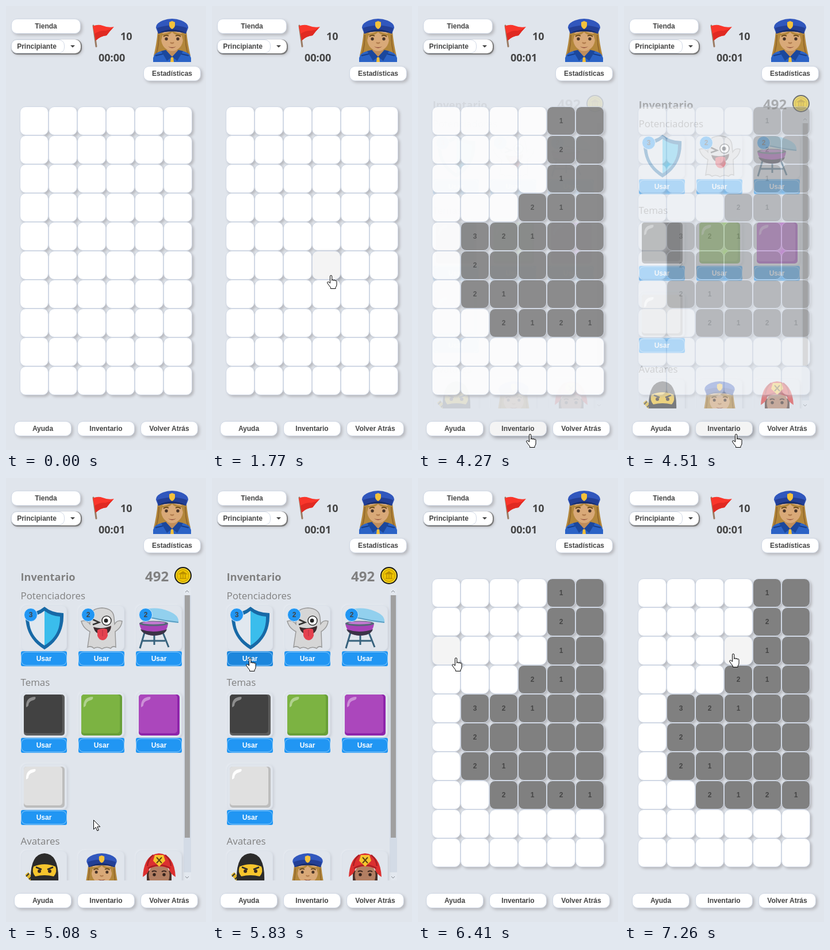
Write an HTML page that moves like this. It is 348x769 px and loops after 8 s.

```html
<!DOCTYPE html>
<html lang="es">
<head>
<meta charset="utf-8">
<title>Buscaminas</title>
<style>
html, body { margin: 0; width: 100%; height: 100%; overflow: hidden; background: #e0e5ec; }
#stage { position: relative; width: 348px; height: 769px; overflow: hidden; background: #e0e5ec; }
.layer { position: absolute; left: 0; top: 0; width: 348px; height: 769px; }
.list { clip-path: inset(188px 0 72px 0); }
.box {
  position: absolute; box-sizing: border-box; border: 1px solid #d1d9e6; border-radius: 10px;
  display: flex; align-items: center; justify-content: center; white-space: nowrap;
  font: bold 12px "Liberation Sans", Arial, sans-serif; color: #444;
}
.btn, .cell { background: #fff; box-shadow: 3px 3px 5px #b8b9be; }
.cell { box-shadow: 3px 3px 4px #b8b9be; }
.btn.hover, .cell.hover { background: #f4f4f4; box-shadow: 3px 3px 6px #989aa0; }
.cell.open { background: #808080; }
.select { background: #fff; border: 0; box-shadow: 1px 1px 1px 1px #777, 3px 3px 5px #b8b9be; }
.pill { background: #fff; }
.card { border-color: #dbe1ea; box-shadow: 2px 2px 4px #c9ced6, -1px -1px 3px #eaeef4; }
.use { background: #2196f3; border: 0; border-radius: 3px; color: #fff; }
.use::after { content: ""; position: absolute; inset: 1px 0; border: 1px solid #8fcbfa; border-radius: 9px; }
.use.hover { background: #1c86dc; }
.badge { background: #2196f3; border-color: #dcecf9; border-radius: 50%; }
svg text { font-family: "Open Sans", "Noto Sans", sans-serif; }
.big { font-weight: 700; font-size: 18px; fill: #444; }
.title { font-weight: 700; font-size: 18.2px; fill: #808080; }
.head { font-size: 16.9px; fill: #808080; }
#cursor { position: absolute; left: 0; top: 0; overflow: visible; }
</style>
</head>
<body>
<div id="stage">
  <svg class="layer" viewBox="0 0 348 769">
    <defs>
      <symbol id="police" viewBox="0 0 76 78">
        <path d="M13 24Q11 46 6 66L18 72H58L70 66Q65 46 63 24Z" fill="#b3873c"/>
        <path d="M15 30Q15 50 10 64M61 30Q61 50 66 64" fill="none" stroke="#94692b" stroke-width="2"/>
        <path d="M5 77V70Q7 61 19 58L38 66 57 58Q69 61 71 70V77Z" fill="#2b63c6"/>
        <path d="M29 50H47V62L38 69 29 62Z" fill="#c08e5c"/>
        <path d="M19 58L27 56 38 68 29 75ZM57 58L49 56 38 68 47 75Z" fill="#1b479c"/>
        <path d="M9 66L22 63M67 66L54 63" stroke="#173d88" stroke-width="2"/>
        <path d="M36 69H40L41 77H35Z" fill="#f2bf3a"/>
        <ellipse cx="38" cy="37" rx="19" ry="21" fill="#d9a978"/>
        <path d="M18 27Q24 30 38 23Q52 30 58 27L61 46Q56 40 55 31Q44 32 38 25Q32 32 21 31Q20 40 15 46Z" fill="#b3873c"/>
        <path d="M23 33Q27 29 32 32M44 32Q49 29 53 33" fill="none" stroke="#6b4a20" stroke-width="2"/>
        <circle cx="28" cy="37" r="2.7" fill="#4a3528"/><circle cx="48" cy="37" r="2.7" fill="#4a3528"/>
        <path d="M35 43Q38 46 41 43" fill="none" stroke="#b27d4e" stroke-width="2.4"/>
        <path d="M31 50Q38 53 45 50Q38 56 31 50Z" fill="#8d4a38"/>
        <path d="M10 18Q9 10 22 5Q38-1 54 5Q67 10 66 18L62 28Q38 19 14 28Z" fill="#3157bd"/>
        <path d="M12 18Q38 9 64 18L62 28Q38 19 14 28Z" fill="#233f95"/>
        <path d="M14 27Q38 14 62 27Q50 24 38 24Q26 24 14 27Z" fill="#172d6c"/>
        <path d="M38 6L43 8V14Q42 18 38 20Q34 18 33 14V8Z" fill="#f4c13c"/>
      </symbol>
    </defs>
    <path d="M152 34L157 70" stroke="#9a7b63" stroke-width="3" stroke-linecap="round"/>
    <path d="M151 35Q160 31 168 34Q178 38 188 36Q180 44 175 51Q164 52 156 60Z" fill="#f9362b"/>
    <path d="M154 48Q164 42 173 43Q180 42 186 38Q180 44 175 51Q164 52 156 60Z" fill="#e02a22"/>
    <text class="big" x="199" y="59">10</text>
    <text class="big" id="timer" x="161" y="96">00:00</text>
    <use href="#police" x="251" y="20" width="76" height="78"/>
  </svg>
  <div id="buttons" class="layer"></div>
  <div id="inv" class="layer">
    <svg class="layer" viewBox="0 0 348 769">
      <text class="title" x="25.500" y="178">Inventario</text>
      <text class="title" x="242" y="179" style="font-size:24px">492</text>
      <circle cx="308" cy="169" r="14" fill="#f6d51f" stroke="#191919" stroke-width="2"/>
      <circle cx="308" cy="169" r="10.500" fill="#efc400" stroke="#b98f00"/>
      <path d="M302 166L308 162 314 166ZM302 174H314M304 167V173M308 167V173M312 167V173" fill="#b98f00" stroke="#b98f00" stroke-width="1.400"/>
      <rect x="309" y="190" width="13" height="507" fill="#e3e8ef"/>
      <rect x="309" y="203" width="13" height="480" fill="#d3dbe6"/>
      <rect x="311" y="203" width="9" height="420" fill="#a0a0a0"/>
      <path d="M312 198L315 195 318 198M312 690L315 693 318 690" fill="none" stroke="#858a91"/>
    </svg>
    <div id="list" class="layer list">
      <div id="cards" class="layer"></div>
      <svg class="layer" viewBox="0 0 348 769">
        <text class="head" x="25.500" y="210">Potenciadores</text>
        <text class="head" x="25.500" y="360">Temas</text>
        <text class="head" x="25.500" y="635">Avatares</text>
        <!-- shield -->
        <path d="M67 223Q80 234 100 234Q102 276 67 297Q32 276 34 234Q54 234 67 223Z" fill="#1769a6"/>
        <path d="M67 230V290Q39 273 40 240Q56 239 67 230Z" fill="#e1e8ef"/>
        <path d="M67 230V290Q95 273 94 240Q78 239 67 230Z" fill="#3abdec"/>
        <!-- ghost -->
        <path d="M146 241Q147 226 167 225Q187 226 188 242L189 253Q194 245 202 248Q201 259 190 266L191 293Q186 290 182 295Q174 291 167 296Q160 291 153 295Q148 290 142 293L146 266Q134 260 131 248Q140 245 146 253Z" fill="#d6d6d6" stroke="#999" stroke-width="1.500"/>
        <path d="M151 245L162 250 151 254" fill="none" stroke="#333" stroke-width="2.500"/>
        <circle cx="175" cy="247" r="8" fill="#fff" stroke="#333" stroke-width="1.500"/>
        <circle cx="174" cy="247" r="3.500" fill="#222"/>
        <path d="M152 258Q167 263 183 256Q182 271 168 271Q155 271 152 258Z" fill="#3c2b2e"/>
        <path d="M159 263Q168 259 176 262L177 273Q174 281 168 281Q161 280 159 273Z" fill="#e4414e"/>
        <path d="M168 263V274" stroke="#b52f40"/>
        <!-- grill -->
        <path d="M241 268L233 295M258 272V289M273 268L283 293M238 282H277" fill="none" stroke="#37627d" stroke-width="3"/>
        <path d="M239 228Q262 222 284 231Q302 238 300 251Q277 250 240 240Z" fill="#92d0ee"/>
        <path d="M241 239Q271 247 300 250" fill="none" stroke="#5d9fc2" stroke-width="2"/>
        <path d="M232 252H282Q280 272 257 273Q235 272 232 252Z" fill="#a843b8"/>
        <path d="M234 262Q257 270 280 262Q276 273 257 273Q238 272 234 262Z" fill="#3a3346"/>
        <ellipse cx="257" cy="252" rx="25" ry="4.500" fill="#556878"/>
        <ellipse cx="257" cy="251" rx="20" ry="2.500" fill="#c37ad0"/>
        <g id="tiles"></g>
        <!-- ninja -->
        <path d="M36 685L48 699" stroke="#e0b62b" stroke-width="7"/>
        <path d="M35 690L40 685M40 695L45 690" stroke="#333" stroke-width="2"/>
        <path d="M43 700Q41 651 67 650Q93 651 91 700Z" fill="#2b2b2b"/>
        <path d="M48 673Q67 665 86 673Q90 682 83 690Q67 686 51 690Q44 682 48 673Z" fill="#f6c52d"/>
        <path d="M52 674L62 678M82 674L72 678" stroke="#2b2b2b" stroke-width="2.500"/>
        <circle cx="58" cy="681" r="3" fill="#3b2a20"/><circle cx="76" cy="681" r="3" fill="#3b2a20"/>
        <use href="#police" x="131" y="648" width="71" height="73"/>
        <!-- firefighter -->
        <path d="M245 700V680H288V700Z" fill="#4a3029"/>
        <ellipse cx="266.500" cy="688" rx="18" ry="22" fill="#b27e62"/>
        <path d="M238 691Q240 652 266 650Q293 652 295 691Q286 686 283 676Q267 669 250 676Q247 686 238 691Z" fill="#dc3030"/>
        <path d="M247 676Q267 665 286 676M256 653Q247 660 246 672M277 653Q286 660 287 672" fill="none" stroke="#a91f24" stroke-width="2.500"/>
        <path d="M259 653H274L277 663 266.500 673 256 663Z" fill="#f6c52d"/>
        <path d="M262 657L271 667M271 657L262 667" stroke="#5c4512" stroke-width="2"/>
        <path d="M254 682Q258 679 262 682M271 682Q275 679 279 682" fill="none" stroke="#3b241d" stroke-width="2"/>
        <circle cx="258" cy="687" r="2.700" fill="#35221c"/><circle cx="275" cy="687" r="2.700" fill="#35221c"/>
      </svg>
      <div id="badges" class="layer"></div>
    </div>
  </div>
  <div id="grid" class="layer"></div>
  <svg id="cursor" width="18" height="25" fill="#fff" stroke="#000">
    <path id="arrow" d="M.5.500V16.500L4.200 13 6.800 19 9.300 18 6.800 12H11.800Z"/>
    <path id="hand" transform="translate(-7)" d="M5.500 14V2.200a1.600 1.600 0 0 1 3.200 0V9.500q0-1.500 1.500-1.500t1.500 1.800q0-1.300 1.400-1.300t1.400 1.800q.200-1 1.200-1t1.300 1.500V17q0 2-2 4.500V23.500H6.500V21.500Q3.500 18 .800 14q-.700-2 1-2.300 1.400-.200 3.700 2.300Z"/>
  </svg>
</div>
<script>
const LOOP = 8000;
const $ = id => document.getElementById(id);

function box(parent, cls, x, y, w, h, text = "") {
  const el = document.createElement("div");
  el.className = "box " + cls;
  el.style.cssText = `left:${x}px;top:${y}px;width:${w}px;height:${h}px`;
  el.textContent = text;
  $(parent).append(el);
  return { el, x, y, w, h };
}

const buttons = [
  box("buttons", "btn", 9, 22, 121, 26, "Tienda"),
  box("buttons", "btn", 239, 104, 100, 26, "Estadísticas"),
  box("buttons", "btn", 14, 719, 100, 26, "Ayuda"),
  box("buttons", "btn", 124, 719, 100, 26, "Inventario"),
  box("buttons", "btn", 234, 719, 100, 26, "Volver Atrás")
];
box("buttons", "select", 9, 58, 121, 24);
box("buttons", "pill", 9, 58, 93, 24, "Principiante").el.style.paddingRight = "4px";
box("buttons", "", 112, 68, 0, 0).el.style.cssText +=
  "border:4px solid transparent;border-top-color:#444;border-bottom:0;border-radius:0";

// Each row lists one column per cell; "#" is still covered, "." is open and empty.
const rows = ["####1.", "####2.", "####1.", "###21.", "#321..", "#2....", "#21...", "##2121", "######", "######"];
const cells = rows.flatMap((row, r) => [...row].map((mark, c) =>
  ({ ...box("grid", "cell", 24 + 50 * c, 174 + 50 * r, 50, 50), mark })));

const columns = [26, 126, 226];
const uses = [];
function card(x, y) {
  box("cards", "card", x, y, 80, 80);
  uses.push(box("cards", "use", x, y + 80, 80, 26, "Usar"));
}
for (const y of [220, 370]) columns.forEach(x => card(x, y));
card(26, 495);
columns.forEach(x => card(x, 645));
const badges = columns.map(x => box("badges", "badge", x + 5, 225, 24, 24, "2").el);

const tile = (x, y, face, edge, shine) => `<g transform="translate(${x} ${y})">
  <rect width="71" height="71" rx="5" fill="${edge}"/>
  <rect width="67" height="67" rx="5" fill="${face}"/>
  <path d="M4 22Q3 4 20 4Q22 8 16 10Q8 12 8 19Q6 22 4 22Z" fill="#fff" opacity="${shine}"/></g>`;
$("tiles").innerHTML = tile(31, 375, "#424242", "#5c5c5c", .4) + tile(131, 375, "#7cb342", "#689f38", .4) +
  tile(231, 375, "#ab47bc", "#8e24aa", .4) + tile(31, 500, "#e0e0e0", "#bdbdbd", 1);

// Bursts of screen updates: start, end, number of steps.
const bursts = [
  [1170, 1940, 10], [2030, 2030, 1], [2450, 2530, 2], [3370, 4100, 10], [4190, 4670, 7],
  [4920, 5660, 10], [5740, 5830, 2], [5990, 6410, 6], [6660, 7260, 8]
];
// Pointer path: time, x, y.
const path = [
  [1170, 329, 732], [1430, 262, 585], [1770, 207, 466], [1940, 198, 457], [2030, 198, 456],
  [2450, 198, 456], [2530, 198, 463], [3370, 198, 463], [3700, 203, 600], [4100, 195, 741],
  [4670, 195, 741], [4920, 190, 715], [5080, 153, 594], [5400, 95, 420], [5660, 69, 327],
  [5740, 66, 318], [5830, 66, 311], [6410, 66, 311], [6660, 80, 311], [6900, 170, 311],
  [7070, 218, 309], [7260, 190, 304]
];

function stepTime(t) {
  const burst = bursts.findLast(b => b[0] <= t);
  if (!burst) return 0;
  const [start, end, n] = burst;
  const gap = n > 1 ? (end - start) / (n - 1) : 1;
  return start + Math.min(n - 1, Math.floor((t - start) / gap + .1)) * gap;
}

function pointer(t) {
  const i = path.findIndex(p => p[0] >= t - .01);
  if (i < 1) return path[i < 0 ? path.length - 1 : 0].slice(1);
  const [a, b] = [path[i - 1], path[i]];
  const u = (t - a[0]) / (b[0] - a[0]);
  return [1, 2].map(k => Math.round(a[k] + (b[k] - a[k]) * u));
}

const ramp = (t, a, b) => Math.min(1, Math.max(0, (t - a) / (b - a))) ** 1.7;
const inside = (b, x, y) => x >= b.x && x < b.x + b.w && y >= b.y && y < b.y + b.h;

function draw(time) {
  const t = stepTime(time % LOOP);
  const [x, y] = pointer(t);
  const shown = t >= 1170;
  const open = t >= 2450;
  const fade = t < 5900 ? ramp(t, 4110, 4670) : 1 - ramp(t, 5906, 6410);

  $("timer").textContent = t >= 3440 ? "00:01" : "00:00";
  badges[0].textContent = t >= 5990 ? "2" : "3";
  $("inv").style.opacity = fade;
  $("grid").style.opacity = 1 - fade;

  let over = false;
  const hover = (b, active) => {
    const on = shown && active && inside(b, x, y);
    b.el.classList.toggle("hover", on);
    over ||= on;
  };
  buttons.forEach(b => hover(b, true));
  uses.forEach(b => hover(b, fade > 0));
  for (const c of cells) {
    const bare = open && c.mark !== "#";
    c.el.classList.toggle("open", bare);
    c.el.textContent = bare && c.mark !== "." ? c.mark : "";
    hover(c, fade === 0 && !bare);
  }

  $("cursor").style.transform = `translate(${x}px, ${y}px)`;
  $("cursor").style.display = shown ? "" : "none";
  $("hand").style.display = over ? "" : "none";
  $("arrow").style.display = over ? "none" : "";
}

const begin = performance.now();
function frame() {
  draw(performance.now() - begin);
  requestAnimationFrame(frame);
}
frame();
</script>
</body>
</html>
```
